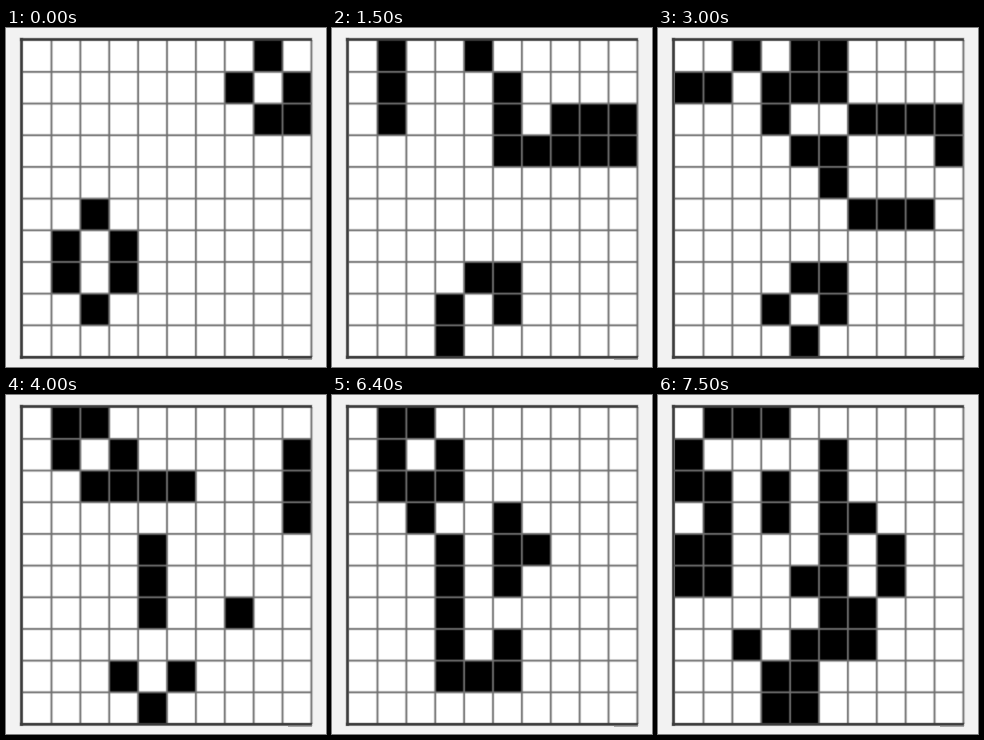
A matplotlib script for the animation above (8 s loop, 320x339 px).

```python
import numpy as np
import matplotlib.pyplot as plt
from matplotlib.animation import FuncAnimation
from matplotlib.patches import Rectangle

W, H, DPI = 320, 339, 80
PX = 72 / DPI               # points per pixel
N = 10                      # cells per side
LEFT, RIGHT = 16.6, 305.4
TOP, BOTTOM = 12.2, 329.0
TICK = 100                  # ms per frame
TICKS_PER_GEN = 5
GENERATIONS = 16


def board(*rows):
    """Build a grid from strings such as '2:89', meaning row 2, columns 8 and 9."""
    grid = np.zeros((N, N), dtype=int)
    for row in rows:
        r, cols = row.split(":")
        for c in cols:
            grid[int(r), int(c)] = 1
    return grid


def step(grid):
    """One Game of Life generation with dead cells beyond the edges."""
    p = np.pad(grid, 1)
    around = sum(p[i:i + N, j:j + N] for i in range(3) for j in range(3)) - grid
    return ((around == 3) | ((grid == 1) & (around == 2))).astype(int)


def history():
    still = board("0:8", "1:79", "2:89", "5:2", "6:13", "7:13", "8:2")
    scatter = (np.random.default_rng(4).random((N, N)) < 0.3).astype(int)
    grid = board("0:23", "1:1234", "2:235689", "3:89", "4:235", "8:3456", "9:34")
    states = [still, scatter]
    while len(states) < GENERATIONS:
        states.append(grid)
        grid = step(grid)
    return states


states = history()

fig = plt.figure(figsize=(W / DPI, H / DPI), dpi=DPI, facecolor="#f2f2f2")
ax = fig.add_axes([0, 0, 1, 1])
ax.set_xlim(0, W)
ax.set_ylim(H, 0)
ax.axis("off")

xs = np.linspace(LEFT, RIGHT, N + 1)
ys = np.linspace(TOP, BOTTOM, N + 1)
cells = ax.pcolormesh(xs, ys, 1 - states[0], cmap="gray", vmin=0, vmax=1, zorder=1)


def grid_lines(width, alpha):
    style = dict(color="#707070", lw=width * PX, alpha=alpha, snap=False, zorder=2)
    ax.vlines(xs[1:], TOP, BOTTOM, **style)
    ax.hlines(ys[1:-1], LEFT, RIGHT, **style)


def bar(x, y, w, h, color, soft=0.6):
    """A solid strip with a faint rim, for a slightly soft edge."""
    for grow, alpha in ((soft, 0.35), (0, 1)):
        ax.add_patch(Rectangle((x - grow, y - grow), w + 2 * grow, h + 2 * grow,
                               fc=color, ec="none", alpha=alpha, snap=False, zorder=3))


grid_lines(3.4, 0.22)
grid_lines(1.7, 0.85)

bar(14.3, 10.3, 291.5, 2.4, "#3c3c3c")
bar(14.3, 10.3, 2.4, 320.2, "#3c3c3c")
bar(14.3, 328.1, 291.5, 2.4, "#3c3c3c")
bar(282, 331, 24, 1, "#a8a8a8", soft=0)


def draw(i):
    cells.set_array(1 - states[i // TICKS_PER_GEN])
    return [cells]


anim = FuncAnimation(fig, draw, frames=GENERATIONS * TICKS_PER_GEN,
                     interval=TICK, repeat=True, repeat_delay=0)
plt.show()
```
